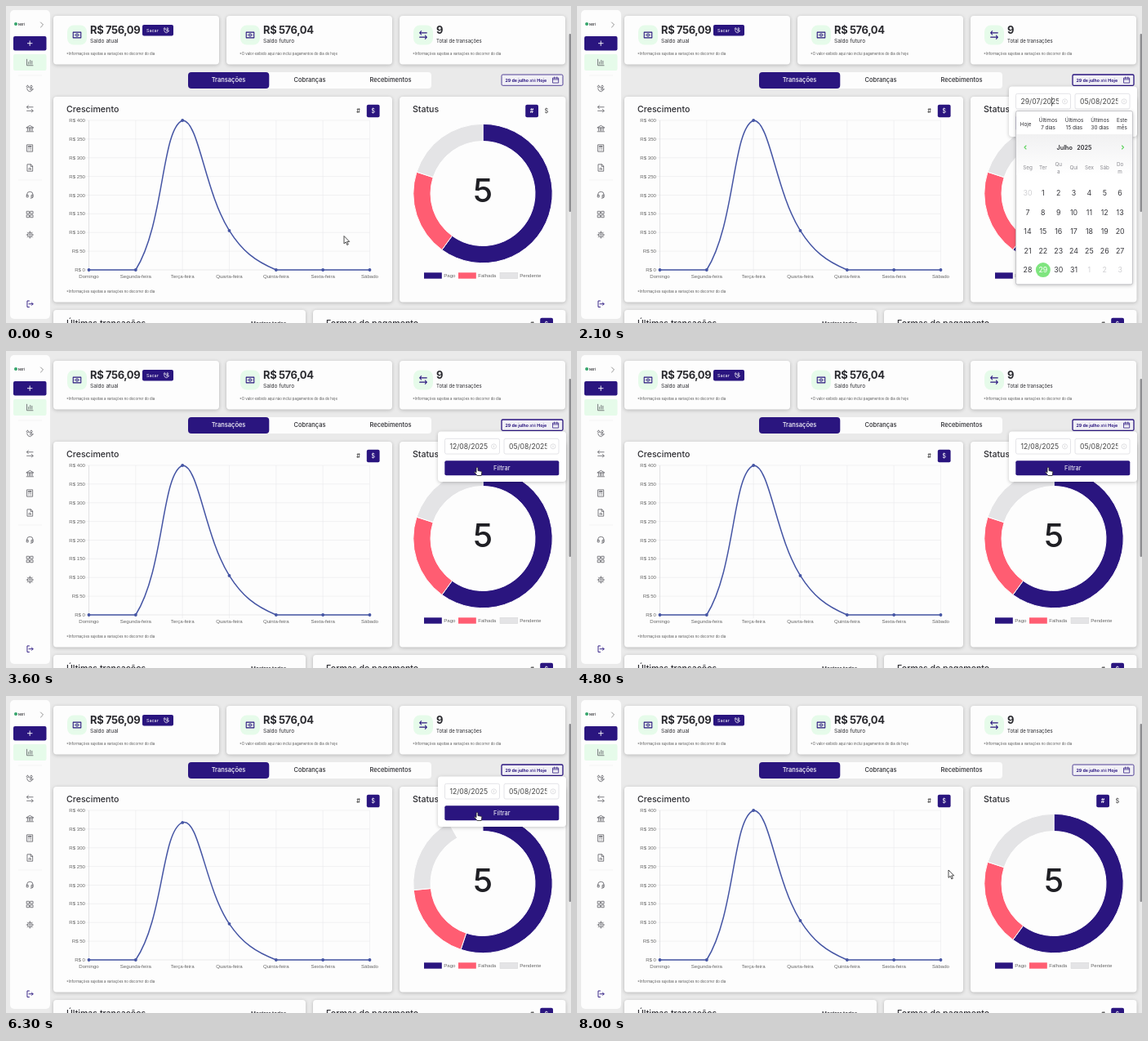
Write an HTML page that moves like this. It is 692x388 px and loops after 8.2 s.

```html
<!DOCTYPE html>
<html lang="pt-BR">
<head>
<meta charset="utf-8">
<title>Painel</title>
<style>
  html, body { margin: 0; width: 100%; height: 100%; overflow: hidden; background: #eaeaea; }
  svg { display: block; width: 100%; height: 100%; }
  text { font-family: Inter, sans-serif; }
  .arial { font-family: "Liberation Sans", Arial, sans-serif; }
  .icon { fill: none; stroke-linecap: round; stroke-linejoin: round; }
  .shadow { filter: drop-shadow(0 1px 2px rgba(0, 0, 0, .22)); }
</style>
</head>
<body>
<svg id="stage" viewBox="0 0 692 388"></svg>
<script>
const LOOP = 8200, STEP = 100;
const NAVY = '#2a157f', INK = '#2b2b30', PINK = '#ff5d72', GREY = '#e4e4e6', LINE = '#4555a4', MINT = '#e6fbea';

const rect = (x, y, w, h, fill, r = 0, extra = '') =>
  `<rect x="${x}" y="${y}" width="${w}" height="${h}" rx="${r}" fill="${fill}" ${extra}/>`;
const text = (x, y, size, str, o = {}) =>
  `<text x="${x}" y="${y}" font-size="${size}" fill="${o.fill || INK}" font-weight="${o.weight || 400}"
    text-anchor="${o.anchor || 'start'}" class="${o.cls || ''}" ${o.extra || ''}>${str}</text>`;
const mid = (x, y, size, str, o = {}) => text(x, y, size, str, { anchor: 'middle', ...o });
const line = (x1, y1, x2, y2, color, w = .6) =>
  `<path d="M${x1} ${y1}L${x2} ${y2}" stroke="${color}" stroke-width="${w}"/>`;
const dot = (x, y, r, fill) => `<circle cx="${x}" cy="${y}" r="${r}" fill="${fill}"/>`;
const group = (id, body, extra = '') => `<g id="${id}" ${extra}>${body}</g>`;

// Icons on a 24 unit grid
const ICONS = {
  cash: 'M2 5h20v14H2zM12 9a3 3 0 1 0 0 6a3 3 0 1 0 0-6M5.5 12h.1M18.4 12h.1',
  swap: 'M7 2L3 6.5 7 11M3 6.5h18M17 13l4 4.5-4 4.5M21 17.5H3',
  coins: 'M5 3a3 3 0 1 0 .1 0M8 7l5 4h4a2 2 0 0 1 0 4h-5M3 12l4 7 6 2 9-7M16 3a3 3 0 1 0 .1 0',
  bank: 'M2 9l10-6 10 6zM5 10v8M10 10v8M14 10v8M19 10v8M2 21h20',
  calc: 'M4 2h16v20H4zM8 6h8v3H8zM8 13h.1M12 13h.1M16 13h.1M8 17h.1M12 17h.1M16 17h.1',
  file: 'M14 2H4v20h16V8zM14 2v6h6M9 17v-3M12 17v-5M15 17v-2',
  headset: 'M3 14v-2a9 9 0 0 1 18 0v2M3 13h4v6H3zM17 13h4v6h-4zM21 19c0 2-3 3-7 3',
  grid: 'M3 3h7v7H3zM14 3h7v7h-7zM3 14h7v7H3zM14 14h7v7h-7z',
  gear: 'M12 5a7 7 0 1 0 .1 0M12 9a3 3 0 1 0 .1 0M12 2v3M12 19v3M2 12h3M19 12h3M5 5l2 2M17 17l2 2M5 19l2-2M17 7l2-2',
  bars: 'M3 3v18h18M8 17v-6M13 17V6M18 17v-9',
  exit: 'M10 3H4v18h6M9 12h12M17 8l4 4-4 4',
  date: 'M3 5h18v16H3zM3 10h18M8 2v5M16 2v5'
};
const icon = (name, x, y, size = 10, color = '#5c5c62', w = 1.9) =>
  `<path class="icon" d="${ICONS[name]}" stroke="${color}" stroke-width="${w}"
    transform="translate(${x - size / 2} ${y - size / 2}) scale(${size / 24})"/>`;

const card = (x, y, w, h) => rect(x, y, w, h, '#fdfdfd', 4, 'class="shadow" style="--s:1"');
const NOTE = '*Informações sujeitas a variações no decorrer do dia';

function sidebar() {
  const items = [['coins', 101], ['swap', 126], ['bank', 150], ['calc', 174], ['file', 198],
    ['headset', 231], ['grid', 255], ['gear', 280]];
  return rect(5, 5, 49, 378, '#fdfdfd', 5)
    + dot(12, 22, 2, '#35a56b') + text(15, 23.6, 3.8, 'Nori', { weight: 600 })
    + '<path class="icon" d="M42.5 20l3 3-3 3" stroke="#777" stroke-width=".8"/>'
    + rect(9, 37, 40.5, 17.5, NAVY, 2)
    + line(26, 45.7, 32.4, 45.7, '#fff', .9) + line(29.2, 42.5, 29.2, 48.9, '#fff', .9)
    + rect(9, 59, 40.5, 20, MINT, 2) + icon('bars', 29.3, 69)
    + line(15, 85, 44, 85, '#ededed') + line(15, 213, 44, 213, '#ededed')
    + items.map(([n, y]) => icon(n, 29.3, y)).join('')
    + icon('exit', 29.3, 364.7, 10, NAVY, 2.2);
}

function summary(x, ic, value, label, note, labelSize = 6.6) {
  return card(x, 12, 203, 59.5) + rect(x + 17, 23.5, 24, 24, MINT, 8)
    + icon(ic, x + 29, 35.5, 11.5, NAVY, 2.2)
    + text(x + 45, 34, 13, value, { weight: 700, extra: 'letter-spacing="-.4"' })
    + text(x + 45, 45, labelSize, label) + text(x + 16, 59.8, 4.3, note, { fill: '#555' });
}

const toggle = (hashX, cashX, y, hashOn) =>
  rect((hashOn ? hashX : cashX) - 7.8, y - 7.5, 15.8, 15.5, NAVY, 2)
  + mid(hashX, y + 2.5, 7, '#', { weight: 600, fill: hashOn ? '#fff' : '#444' })
  + mid(cashX, y + 2.7, 7.5, '$', { fill: hashOn ? '#444' : '#fff' });

function header() {
  return summary(58, 'cash', 'R$ 756,09', 'Saldo atual', NOTE)
    + rect(167, 23, 38, 13.5, NAVY, 2) + text(172, 31.6, 5.4, 'Sacar', { fill: '#fff' })
    + icon('coins', 196.5, 29.8, 8, '#fff', 2)
    + summary(270, 'cash', 'R$ 576,04', 'Saldo futuro', '*O valor exibido aqui não inclui pagamentos do dia de hoje', 6.6)
    + summary(482, 'swap', '9', 'Total de transações', NOTE, 6)
    + rect(223, 81, 298, 20, '#fdfdfd', 4) + rect(223, 81, 99.3, 20, NAVY, 4)
    + mid(272.5, 93.4, 7.5, 'Transações', { fill: '#fff', weight: 500 })
    + mid(372, 93.4, 7.5, 'Cobranças', { weight: 500 })
    + mid(471, 93.4, 7.5, 'Recebimentos', { weight: 500 })
    + rect(607, 84, 75, 13.3, '#f1f0f6', 1.5, `id="dateBtn" stroke="${NAVY}" stroke-width=".8"`)
    + text(611.5, 92.8, 5.3, '29 de julho <tspan font-weight="400">até</tspan> Hoje', { weight: 700, fill: NAVY })
    + icon('date', 673.3, 90.7, 9, NAVY, 2);
}

// Line chart
const X0 = 101.5, DX = 57.33, BASE = 323, TOP = 140;
const DAYS = ['Domingo', 'Segunda-feira', 'Terça-feira', 'Quarta-feira', 'Quinta-feira', 'Sexta-feira', 'Sábado'];
const VALUES = [0, 0, 400, 105, 0, 0, 0];

function growth() {
  let s = card(58, 111, 415, 251.5) + text(74, 130.3, 10.6, 'Crescimento', { weight: 500 })
    + toggle(431.5, 449.6, 128.3, false);
  for (let i = 0; i <= 8; i++) {
    const y = BASE - i * (BASE - TOP) / 8;
    s += line(97.5, y, 445.5, y, i ? '#e9e9eb' : '#dcdcde')
      + text(97, y + 2.1, 6.1, 'R$ ' + i * 50, { anchor: 'end', fill: '#666', cls: 'arial' });
  }
  DAYS.forEach((d, i) => {
    const x = X0 + i * DX;
    s += line(x, TOP, x, 327, i ? '#e9e9eb' : '#d0d0d3') + mid(x, 333.4, 6.1, d, { fill: '#666', cls: 'arial' });
  });
  return s + text(74, 350.5, 4.3, NOTE, { fill: '#555' }) + '<g id="curve"></g>';
}

// Cubic spline with tension, handles kept inside the plot
function curve(k) {
  const p = VALUES.map((v, i) => [X0 + i * DX, BASE - (BASE - TOP) * v / 400 * k]);
  const clamp = y => Math.min(BASE, Math.max(TOP, y));
  const gap = (a, b) => Math.hypot(a[0] - b[0], a[1] - b[1]);
  const handles = p.map((c, i) => {
    const a = p[i - 1] || c, b = p[i + 1] || c, d1 = gap(a, c), d2 = gap(c, b);
    const at = f => [c[0] + f * (b[0] - a[0]), clamp(c[1] + f * (b[1] - a[1]))];
    return [at(-.4 * d1 / (d1 + d2)), at(.4 * d2 / (d1 + d2))];
  });
  const d = p.slice(1).map((c, i) => `C${handles[i][1]} ${handles[i + 1][0]} ${c}`).join('');
  return `<path d="M${p[0]}${d}" fill="none" stroke="${LINE}" stroke-width="1.5"/>`
    + p.map(c => dot(c[0], c[1], 1.9, LINE)).join('');
}

// Ring chart
const CX = 584, CY = 229.5, OUTER = 85.2, INNER = 64;
const SHARES = [[3, NAVY], [1, PINK], [1, GREY]];

function ring(k) {
  if (k <= 0) return '';
  const pt = (r, a) => `${CX + r * Math.sin(a)} ${CY - r * Math.cos(a)}`;
  let a = 0;
  return SHARES.map(([n, color]) => {
    const b = a + n / 5 * 2 * Math.PI * k, big = +(b - a > Math.PI);
    const d = `M${pt(OUTER, a)}A${OUTER} ${OUTER} 0 ${big} 1 ${pt(OUTER, b)}L${pt(INNER, b)}A${INNER} ${INNER} 0 ${big} 0 ${pt(INNER, a)}Z`;
    a = b;
    return `<path d="${d}" fill="${color}" stroke="#fff" stroke-width="1"/>`;
  }).join('');
}

function status() {
  const keys = [[512, 'Pago', NAVY], [554, 'Falhada', PINK], [605, 'Pendente', GREY]];
  return card(482, 111, 203.5, 251.5) + text(498, 130.3, 10.6, 'Status', { weight: 500 })
    + toggle(644, 662, 128.3, true) + '<g id="ring"></g>'
    + mid(CX, 239.5, 40, '5', { weight: 500, fill: '#1f1f24' })
    + keys.map(([x, t, c]) => rect(x, 326.3, 21.8, 7.4, c, 0, c === GREY ? 'stroke="#d6d6d8" stroke-width=".5"' : '')
      + text(x + 24.2, 332.3, 6.1, t, { fill: '#666', cls: 'arial' })).join('');
}

function footer() {
  return card(58, 372, 309, 30) + text(74, 391.8, 10.6, 'Últimas transações', { weight: 500 })
    + text(300, 391.3, 6.5, 'Mostrar todas', { weight: 500 })
    + card(376, 372, 309.5, 30) + text(392, 391.8, 10.6, 'Formas de pagamento', { weight: 500 })
    + toggle(644.5, 662, 389.3, false)
    + rect(689.6, 34, 2.4, 218, '#8d8d90', 1);
}

// Date filter
function field(x, id, value) {
  return rect(x, 107.3, 67, 18.7, '#fff', 2, 'stroke="#dedee2" stroke-width=".8"')
    + `<svg x="${x}" y="107" width="52.5" height="19"><text id="${id}" x="6" y="13" font-size="8.6" fill="#444">${value}</text></svg>`
    + `<circle cx="${x + 60}" cy="116.8" r="3" fill="none" stroke="#d2d2d6" stroke-width=".7"/>`
    + line(x + 60, 115.4, x + 60, 118.2, '#c4c4c8');
}
const popup = () => rect(529, 98.5, 157, 61.5, '#fff', 4, 'class="shadow"')
  + field(537.5, 'from', '') + field(610, 'to', '05/08/2025')
  + rect(537.3, 134.3, 140, 18, NAVY, 2)
  + mid(607.3, 145.9, 7.5, 'Filtrar', { fill: '#fff' });

function month(name, lead, leadEnd, len, picked) {
  let s = mid(609, 175.7, 7.2, name + '&#160;&#160; 2025', { weight: 600 });
  for (let i = 0; i < 35; i++) {
    const x = 552 + 18.85 * (i % 7), y = 228.7 + 23.6 * Math.floor(i / 7);
    const n = i - lead + 1, out = n < 1 || n > len, on = n === picked;
    if (on) s += dot(x, y, 9, '#7fe57f');
    s += mid(x, y + 3.2, 8.8, n < 1 ? leadEnd + n : n > len ? n - len : n,
      { fill: on ? '#fff' : out ? '#cfcfd2' : '#38383d' });
  }
  return s;
}
function calendar() {
  const presets = [[577, '7 dias'], [609, '15 dias'], [640.5, '30 dias']];
  const week = ['Seg', 'Ter', 'Qu|a', 'Qui', 'Sex', 'Sáb', 'Do|m'];
  const small = (x, y, t, fill) => mid(x, y, 6.3, t, { fill });
  return rect(537.6, 128.5, 142.8, 212.3, '#fff', 2, 'stroke="#b9b9be" stroke-width=".8" class="shadow"')
    + rect(538, 157, 142, 50, 'url(#fade)')
    + small(549.7, 147, 'Hoje')
    + presets.map(([x, t]) => small(x, 142.3, 'Últimos') + small(x, 151.3, t)).join('')
    + small(667.5, 142.3, 'Este') + small(667.5, 151.3, 'mês')
    + '<path class="icon" d="M550 171l-2 2 2 2M667.5 171l2 2-2 2" stroke="#5fd35f" stroke-width="1.1"/>'
    + week.map((d, i) => d.split('|').map((t, j) => small(552 + 18.85 * i, (d.includes('|') ? 195.5 : 200) + 9 * j, t, '#8a8a90')).join('')).join('')
    + group('july', month('Julho', 1, 30, 31, 29)) + group('august', month('Agosto', 4, 31, 31, 0));
}

const cursors = group('arrow', '<path d="M0 0v9.4l2.2-2 1.6 3.6 1.5-.7-1.6-3.4h3z" fill="#fff" stroke="#222" stroke-width=".8"/>')
  + group('hand', '<path d="M-1 1a1 1 0 0 1 2 0v3l4 .8q1 .3 .8 1.5l-.7 3.7h-5l-3.4-4.2q.4-1.1 2.3 .4z" fill="#fff" stroke="#222" stroke-width=".8" stroke-linejoin="round"/>')
  + group('beam', '<path d="M-1.6-5h3.2M0-5v10M-1.6 5h3.2" stroke="#333" stroke-width=".8"/>');

const $ = id => document.getElementById(id);
$('stage').innerHTML = '<defs><linearGradient id="fade" x2="0" y2="1"><stop stop-color="#f1f1f2"/><stop offset="1" stop-color="#fff"/></linearGradient></defs>'
  + rect(0, 0, 692, 388, '#eaeaea') + sidebar() + header() + growth() + status() + footer()
  + group('popup', popup()) + group('calendar', calendar())
  + group('caret', line(581.5, 111.5, 581.5, 122.5, '#333', .8)) + group('cursor', cursors);

// Pointer stops: time, x, y
const STOPS = [[100, 414, 281.5], [900, 673, 93.5], [1200, 673, 93.5], [1800, 582, 117], [2500, 582, 117],
  [2700, 578, 134], [2950, 668, 172], [3050, 668, 172], [3250, 571, 274], [3350, 571, 274],
  [3600, 577, 142.5], [6500, 577, 142.5], [7100, 673, 90], [7300, 673, 90], [8000, 455, 213]];

function pointer(t) {
  const i = STOPS.findIndex(s => s[0] >= t);
  if (i < 1) return (i ? STOPS[STOPS.length - 1] : STOPS[0]).slice(1);
  const [a, b] = [STOPS[i - 1], STOPS[i]], u = (t - a[0]) / (b[0] - a[0]), e = u * u * (3 - 2 * u);
  return [a[1] + (b[1] - a[1]) * e, a[2] + (b[2] - a[2]) * e];
}
const show = (id, on) => { $(id).style.display = on ? '' : 'none'; };
const within = (t, a, b) => t >= a && t < b;

let grown;
function draw(t) {
  const open = within(t, 1200, 7300), picking = within(t, 2000, 3300), next = t >= 3000;
  show('popup', open);
  show('calendar', picking);
  show('caret', picking);
  show('july', !next);
  show('august', next);
  $('from').textContent = t < 3300 ? '29/07/2025' : '12/08/2025';
  $('dateBtn').setAttribute('stroke-width', open ? 1.3 : .8);

  const u = Math.min(1, Math.max(0, (t - 5834) / 1000));
  const k = t < 5700 ? 1 : 1 - (1 - u) ** 4;
  if (k !== grown) {
    grown = k;
    $('curve').innerHTML = curve(k);
    $('ring').innerHTML = ring(k);
  }

  const [x, y] = pointer(t);
  const onDate = x > 607 && x < 682 && y > 84 && y < 97.5;
  const onPanel = open && x > 537 && x < 678 && y > 130 && (picking || y < 153);
  const onField = open && x > 537 && x < 677 && y > 107 && y < 126;
  const kind = onDate || onPanel ? 'hand' : onField ? 'beam' : 'arrow';
  ['arrow', 'hand', 'beam'].forEach(c => show(c, c === kind && !(c === 'beam' && picking)));
  $('cursor').setAttribute('transform', `translate(${x} ${y})`);
}

const start = performance.now();
function tick() {
  const t = (performance.now() - start) % LOOP;
  draw(Math.floor(t / STEP) * STEP);
  requestAnimationFrame(tick);
}
tick();
</script>
</body>
</html>
```
